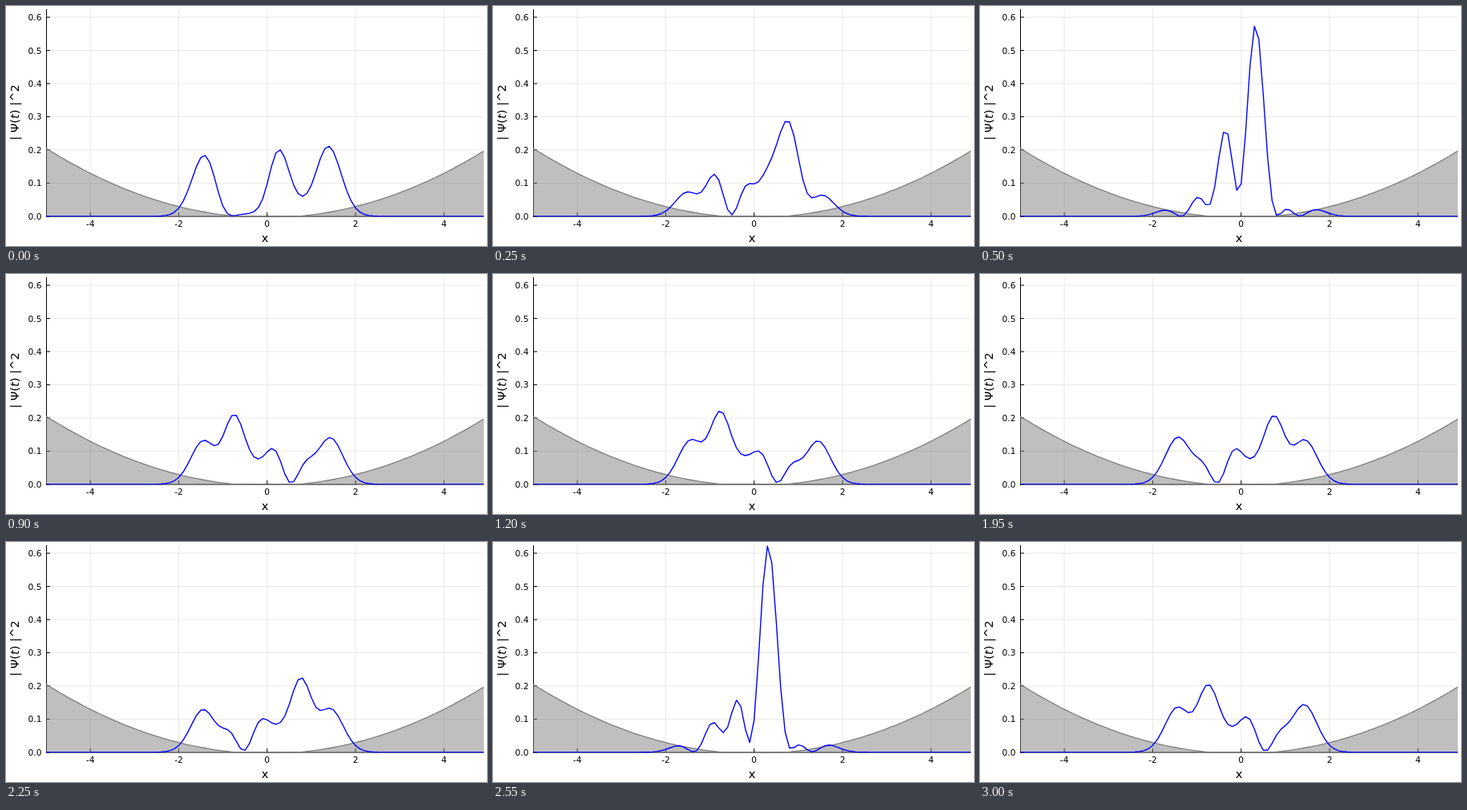
These frames come from a looping animation (600 px wide and 300 px high, 3050 ms). An HTML page with a canvas:

```html
<!DOCTYPE html>
<html lang="en">
<head>
<meta charset="utf-8">
<title>Oscillator wave packet</title>
<style>
  html, body { margin: 0; width: 100%; height: 100%; overflow: hidden; background: #fff; }
  canvas, svg { position: absolute; left: 0; top: 0; width: 600px; height: 300px; }
  text { font-family: "DejaVu Sans", sans-serif; font-size: 10.67px; fill: #000; }
  .title { font-size: 14.67px; text-anchor: middle; }
</style>
</head>
<body>
<canvas id="plot" width="600" height="300"></canvas>
<svg id="labels" viewBox="0 0 600 300">
  <text class="title" x="323" y="295">x</text>
  <text class="title" transform="translate(16 133) rotate(-90)">| Ψ(<tspan font-style="italic">t</tspan>) |^2</text>
</svg>
<script>
const ctx = document.getElementById("plot").getContext("2d");
const labels = document.getElementById("labels");

const LEFT = 50, RIGHT = 596, TOP = 4, BASE = 263;
const STEP_MS = 50, STEPS = 61, DT = 0.15;
const K = 3;            // mass times angular frequency
const AMP = Math.sqrt(0.1);
const LAG = 0.33;       // phase of the ground state against the others
const STATES = [0, 1, 3, 5];

const px = x => LEFT + (x + 5) * (RIGHT - LEFT) / 9.9;
const py = y => 262.9 - y * 414.8;
const xs = Array.from({ length: 100 }, (_, i) => (i - 50) / 10);
const potential = x => 0.00836 * x * x - 0.004;

// Normalised oscillator eigenfunction, by upward recurrence
function eigen(n, x) {
  const q = Math.sqrt(K) * x;
  let prev = 0, cur = (K / Math.PI) ** 0.25 * Math.exp(-q * q / 2);
  for (let k = 0; k < n; k++) {
    [prev, cur] = [cur, Math.sqrt(2 / (k + 1)) * q * cur - Math.sqrt(k / (k + 1)) * prev];
  }
  return cur;
}

const basis = xs.map(x => STATES.map(n => AMP * eigen(n, x)));

function density(i, t) {
  let re = 0, im = 0;
  STATES.forEach((n, j) => {
    const phase = n * t - (n ? LAG : 0);
    re += basis[i][j] * Math.cos(phase);
    im += basis[i][j] * Math.sin(phase);
  });
  return re * re + im * im;
}

function trace(ys) {
  ctx.beginPath();
  ys.forEach((y, i) => ctx.lineTo(px(xs[i]), py(y)));
}

function stroke(color, width) {
  ctx.strokeStyle = color;
  ctx.lineWidth = width;
  ctx.stroke();
}

function segment(x1, y1, x2, y2, color) {
  ctx.beginPath();
  ctx.moveTo(x1, y1);
  ctx.lineTo(x2, y2);
  stroke(color, 1);
}

const xTicks = [-4, -2, 0, 2, 4];
const yTicks = [0, 0.1, 0.2, 0.3, 0.4, 0.5, 0.6];
const well = xs.map(potential);

function drawAxes() {
  const grid = "rgba(0,0,0,0.09)";
  xTicks.forEach(v => segment(px(v), TOP, px(v), BASE, grid));
  yTicks.forEach(v => segment(LEFT, py(v), RIGHT, py(v), grid));
  segment(LEFT + 0.5, TOP, LEFT + 0.5, BASE + 0.5, "#000");
  segment(LEFT, BASE, RIGHT, BASE, "#000");
  xTicks.forEach(v => segment(px(v), BASE, px(v), BASE - 5, "#000"));
  yTicks.forEach(v => segment(LEFT, py(v), LEFT + 5, py(v), "#000"));
}

function draw(step) {
  ctx.clearRect(0, 0, 600, 300);
  drawAxes();
  ctx.save();
  ctx.beginPath();
  ctx.rect(LEFT, TOP, RIGHT - LEFT, BASE + 0.5 - TOP);
  ctx.clip();
  trace(well);
  ctx.lineTo(RIGHT, py(0));
  ctx.lineTo(LEFT, py(0));
  ctx.fillStyle = "rgba(128,128,128,0.5)";
  ctx.fill();
  trace(well);
  stroke("#808080", 1.33);
  ctx.lineJoin = "round";
  trace(xs.map((_, i) => density(i, step * DT)));
  stroke("#00f", 1.4);
  ctx.restore();
}

function label(text, x, y, anchor) {
  const el = document.createElementNS("http://www.w3.org/2000/svg", "text");
  el.setAttribute("x", x);
  el.setAttribute("y", y);
  el.setAttribute("text-anchor", anchor);
  el.textContent = text;
  labels.append(el);
}

xTicks.forEach(v => label(v, px(v), 276, "middle"));
yTicks.forEach(v => label(v.toFixed(1), 44.5, py(v) + 4, "end"));

const start = performance.now();
let shown = -1;
function tick() {
  const step = Math.floor((performance.now() - start) / STEP_MS) % STEPS;
  if (step !== shown) draw(shown = step);
  requestAnimationFrame(tick);
}
tick();
</script>
</body>
</html>
```
